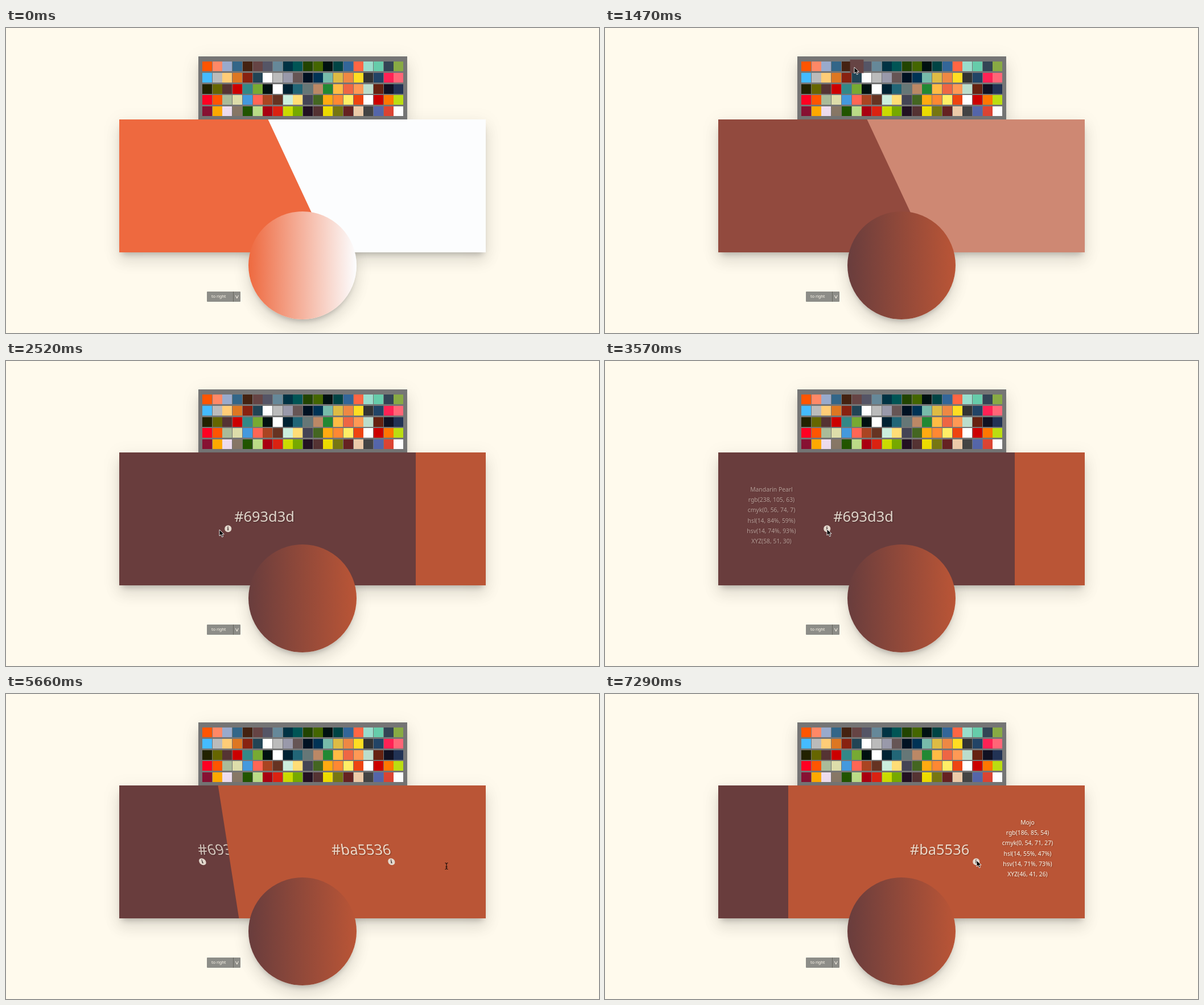
These frames come from a looping animation (1042 by 537 pixels, 8 s). An HTML page:

```html
<!DOCTYPE html>
<html lang="en">
<head>
<meta charset="utf-8">
<title>Colour pair picker</title>
<style>
  html, body { margin: 0; width: 100%; height: 100%; overflow: hidden; background: #fffaed; }
  body { position: relative; font-family: "Noto Sans", "Open Sans", sans-serif; color: #fffaed; }
  div, svg { position: absolute; }
  .raised {
    box-shadow: 0 16px 24px 2px rgba(0, 0, 0, .08), 0 6px 30px 5px rgba(0, 0, 0, .05),
      0 8px 10px -5px rgba(0, 0, 0, .22);
  }
  #palette { left: 338px; top: 50px; width: 367px; height: 112px; background: #757575; isolation: isolate; }
  #palette div { width: 17px; height: 17px; }
  .disc { left: 426px; top: 323px; width: 190px; height: 190px; border-radius: 50%; }
  #stage { left: 199px; top: 161px; width: 644px; height: 234px; overflow: hidden; isolation: isolate; }
  .panel { left: -199px; top: -161px; width: 1042px; height: 537px; }
  .label, .info, .icon { left: 0; top: 0; white-space: pre; text-shadow: 1px 1px 2px rgba(0, 0, 0, .3); }
  .label { font-size: 25.4px; line-height: 36px; color: rgba(255, 250, 237, .82); }
  .info { font-size: 10.35px; line-height: 18.2px; text-align: center; }
  .icon {
    width: 11.5px; height: 11.5px; border-radius: 50%; background: #e3d8cd; color: #3a2a28;
    font: bold 9px/11.5px "Noto Serif", serif; text-align: center; text-shadow: none;
  }
  #select {
    left: 353px; top: 464px; width: 59px; height: 18px; border-radius: 1px; background: #8d8d88;
    font-size: 7.3px; line-height: 17px; font-weight: 500;
  }
  #select div { top: 0; height: 18px; }
</style>
</head>
<body>
<div id="palette" class="raised"></div>
<div class="disc raised"></div>
<div id="stage" class="raised">
  <div class="panel" id="left">
    <div class="label">#693d3d</div>
    <div class="icon">i</div>
    <div class="info">Mandarin Pearl
rgb(238, 105, 63)
cmyk(0, 56, 74, 7)
hsl(14, 84%, 59%)
hsv(14, 74%, 93%)
XYZ(58, 51, 30)</div>
  </div>
  <div class="panel" id="right">
    <div class="label">#ba5536</div>
    <div class="icon">i</div>
    <div class="info">Mojo
rgb(186, 85, 54)
cmyk(0, 54, 71, 27)
hsl(14, 55%, 47%)
hsv(14, 71%, 73%)
XYZ(46, 41, 26)</div>
  </div>
</div>
<div class="disc" id="disc"></div>
<div id="select">
  <div style="left:8px">to right</div>
  <div style="left:46px;border-left:1px solid #66665f"></div>
  <svg width="59" height="18" fill="none" stroke="#fffaed"><path d="M50.3 6.5l2.5 5.5L55.3 6.5"/></svg>
</div>
<svg id="cursor" width="20" height="20" viewBox="-6 -6 20 20" overflow="visible">
  <path id="arrow" d="M0 0V11L2.6 8.6L4.6 13L6.6 12.1L4.7 8H8.2Z" stroke="#fff" stroke-width=".9"/>
  <path id="beam" d="M-2.5 -5.5Q0 -5.5 0 -4V4Q0 5.5 -2.5 5.5M2.5 -5.5Q0 -5.5 0 -4M0 4Q0 5.5 2.5 5.5M-1.5 1.5H1.5"
    fill="none" stroke="#000"/>
</svg>
<script>
const LOOP = 8000, TICK = 149, LEAD = 22, SKEW = 25;
const $ = id => document.getElementById(id);

const swatches = `
  f50 f86 9ac 368 421 644 556 689 034 055 240 460 011 044 369 f64 9dc 6ca 345 8a4
  4bf bbb fc7 d72 821 245 fff bbb 99a 655 012 035 7ba db4 e84 fd2 333 246 f25 f67
  220 660 533 c00 388 7a3 011 fff 023 267 677 b86 283 fb4 e64 f95 bdc 621 112 235
  f02 f50 ab9 dda 49d f65 a42 632 ced fd7 445 462 fa1 f83 fe6 e41 fff c00 f70 bd1
  813 fa0 ede 876 250 bd8 a01 d21 cd0 7a0 212 533 ed0 771 622 eca 444 56a d43 fff
`.trim().split(/\s+/).map((hex, i) => {
  const el = document.createElement('div');
  el.style.cssText = `background:#${hex};left:${7 + i % 20 * 17.7}px;top:${9 + Math.floor(i / 20) * 19.75}px`;
  return $('palette').appendChild(el);
});
const picked = swatches[5];

const ramp = (t, a, b) => Math.min(1, Math.max(0, (t - a) / (b - a)));
const ease = (t, a, b) => { const p = ramp(t, a, b); return p * p * (3 - 2 * p); };
const rgb = c => `rgb(${c.map(Math.round)})`;

const enterRight = t => ease(t, 5340, 5880);
const sides = [
  { el: $('left'), mirror: x => x, from: [238, 105, 63], to: [105, 61, 61], infoX: 292.5,
    hover: t => ease(t, 2020, 2480) - enterRight(t),
    info: t => ramp(t, 3430, 3720) - ramp(t, 4620, 4780) },
  { el: $('right'), mirror: x => 1042 - x, from: [252, 253, 254], to: [186, 85, 54], infoX: 742.5,
    hover: enterRight,
    info: t => ramp(t, 7000, 7300) }
];

// Cursor moves: start, end, x, y
const APPEAR = 298;
const moves = [
  [APPEAR, 745, 441, 76], [745, 894, 438, 69], [1788, 2533, 375, 297],
  [2682, 2980, 385, 308], [2980, 3278, 390, 296], [4917, 5600, 774, 303],
  [5811, 6109, 728, 312], [6109, 6556, 639, 300], [6556, 6854, 653, 293]
];
const cursorAt = t => moves.reduce(([x, y], [a, b, toX, toY]) => {
  const p = ease(t, a, b);
  return [x + (toX - x) * p, y + (toY - y) * p];
}, [457, 19]);

function place(el, x, y, skew, opacity) {
  el.style.transform = `translate(${x}px,${y}px) translate(-50%,-50%) skewX(${skew}deg)`;
  el.style.opacity = opacity;
}

function drawSide({ el, mirror, from, to, infoX, hover, info }, t, mix) {
  const h = hover(t), skew = SKEW * (1 - h);
  const lean = 117 * Math.tan(skew * Math.PI / 180);
  const edge = mirror(527 + 193 * h), outer = mirror(199);
  const [label, icon, details] = el.children;
  el.style.background = rgb(from.map((v, i) => v + (to[i] - v) * mix));
  el.style.clipPath =
    `polygon(${outer}px 161px,${edge - lean}px 161px,${edge + lean}px 395px,${outer}px 395px)`;
  place(label, mirror(354 + 100 * h), 273, skew, Math.min(1, 2.5 * h));
  place(icon, mirror(320 + 70 * h), 295, skew, h > 0 ? 1 : 0);
  place(details, infoX, 271.5, 0, info(t));
  return h;
}

function draw(time) {
  const t = Math.floor((time % LOOP + LEAD) / TICK) * TICK;
  const mix = ease(t, 1300, 1600);
  const [hoverLeft, hoverRight] = sides.map(side => drawSide(side, t, mix));
  $('left').style.zIndex = hoverLeft > 0 && hoverRight === 0 ? 1 : 0;

  const [a, b] = sides.map(side => rgb(mix > 0 ? side.to : side.from));
  $('disc').style.background = `linear-gradient(to right,${a},${b})`;

  const grow = ramp(t, 600, 890) - ramp(t, 1880, 2080);
  picked.style.transform = `scale(${1 + .4 * grow})`;
  picked.style.zIndex = grow > 0 ? 1 : 0;

  const [x, y] = cursorAt(t), overText = x > 705;
  $('cursor').style.transform = `translate(${x - 6}px,${y - 6}px)`;
  $('cursor').style.display = t < APPEAR ? 'none' : 'block';
  $('arrow').style.display = overText ? 'none' : 'inline';
  $('beam').style.display = overText ? 'inline' : 'none';
}

const start = performance.now();
function frame() {
  draw(performance.now() - start);
  requestAnimationFrame(frame);
}
frame();
</script>
</body>
</html>
```
